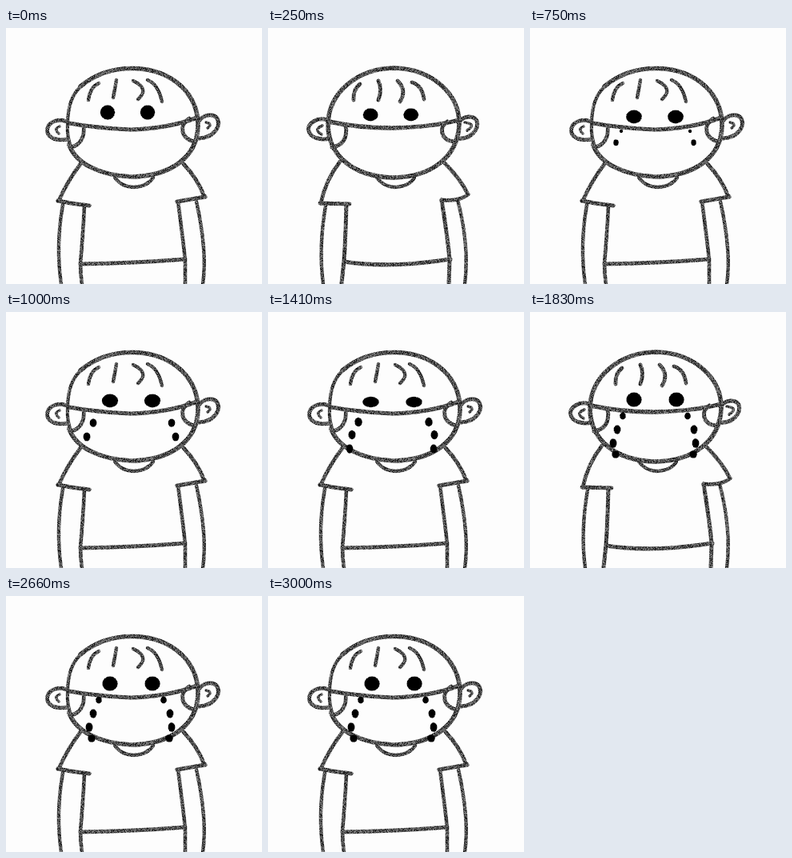
Animation, 320 px wide and 320 px high, one loop 10 s. Source, as an HTML page with a canvas:

```html
<!DOCTYPE html>
<html lang="en">
<head>
<meta charset="utf-8">
<title>Crying behind the mask</title>
<style>
  html, body { margin: 0; width: 100%; height: 100%; overflow: hidden; background: #fdfdfd; }
  canvas { display: block; width: 320px; height: 320px; }
</style>
</head>
<body>
<canvas id="stage" width="320" height="320"></canvas>
<script>
const SIZE = 320, LOOP = 10000, FPS = 12, LAST = 36;
const stage = document.getElementById('stage').getContext('2d');

// Two drawings of the boy; each entry is [line width, path].
const poses = [
  [
    [5.6, 'M93 73C112 57 136 50 160 50.500C210 52 241 84 240 124C238 162 206 185 157 186C116 184 87 169 79 146'],
    [4.2, 'M96 71C80 83 77 104 77 121Q76 138 82 150'],
    [5.2, 'M79 119Q112 125 155 127Q202 126 239 112'],
    [4.8, 'M97 122C99 137 92 147 81 149M229 113C217 121 217 137 235 142'],
    [5, 'M76 117C63 112 51 119 51.500 129C53 139 65 141 77 139'],
    [5, 'M240 118C246 108 258 106 264 113C269 123 260 137 241 138'],
    [3.4, 'M67 123Q59 126 66 132M250 118Q259 120 252 125'],
    [4.4, 'M116 69Q105 74 103 90M138 65Q136 77 134 87M159 66Q180 76 165 89M177 65Q190 70 195 92'],
    [4.4, 'M136 187Q145 199 160 199Q177 198 184 187'],
    [4.8, 'M93 170Q77 191 66 216M222 170Q240 189 248 211'],
    [5.2, 'M65 216Q84 220 104 222M249 211L214 217'],
    [4.6, 'M98 222Q96 262 93 294Q93 307 95 320M215 217Q221 262 224 290L224 320'],
    [4.4, 'M71 221Q62 273 69 320M238 217Q252 280 246 320'],
    [4.8, 'M93 295Q160 294 224 289']
  ],
  [
    [5.6, 'M157 50C207 51 240 84 239 121C237 161 205 186 157 187C106 186 75 159 75 120C76 80 112 51 157 50Z'],
    [5.4, 'M76 117Q113 125 155 125Q204 124 239 115'],
    [5, 'M97 121C100 138 93 147 80 149M224 117C213 124 216 140 232 142'],
    [5, 'M74 115C62 111 50 119 50.500 127C52 137 65 141 77 138'],
    [5, 'M238 118C245 109 257 109 261 116C264 126 254 140 236 138'],
    [3.6, 'M68 122Q56 127 67 133M246 118Q261 120 249 128'],
    [4.8, 'M115 70Q106 77 107 90M138 66Q143 77 138 90M162 66Q174 78 165 92M180 68Q193 72 195 89'],
    [4.4, 'M136 187Q144 198 158 199Q177 198 183 187'],
    [4.8, 'M90 167Q72 190 66 219M220 168Q241 189 250 208'],
    [4.8, 'M65 219L102 220M250 208Q240 217 217 215'],
    [5, 'M98 220Q97 262 95 291L92 319M217 215Q225 265 227 290L226 320'],
    [4.4, 'M72 222Q63 275 69 320M237 215Q252 272 246 320'],
    [5.2, 'M95 292Q150 301 228 289']
  ]
];

// Keys: step, left x, right x, y, x radius, y radius.
const eyeKeys = [
  [0, 127, 177, 105.5, 9.3, 9.2],
  [2, 127.5, 178, 106.5, 9.4, 9],
  [6, 130, 181, 114, 9.8, 5.5],
  [9, 130, 182, 111, 10, 8.5],
  [12, 130, 183, 111, 10.2, 8.5],
  [17, 128.5, 182.5, 112.5, 10.4, 6.8],
  [20, 130, 183, 109.5, 9.7, 9.3]
];
const tearKeys = [
  [[6, 114, 197, 130.5, 2.2, 2.2], [12, 101, 212, 156, 4.5, 5.6], [17, 102, 207, 171, 4.4, 5.8], [20, 107, 204, 178, 4.8, 4.8]],
  [[9, 114, 200, 129, 2.2, 2.2], [12, 109, 207, 138.5, 4.4, 5.3], [17, 105, 208, 153.5, 4.6, 5.8], [20, 104, 207, 164, 4.5, 6]],
  [[15, 115, 198, 130, 2.2, 2.2], [17, 113, 201, 137.5, 4.8, 5.8], [20, 109, 205, 147, 4.5, 5.8]],
  [[18, 117, 196, 128, 2.2, 2.2], [20, 116, 197, 130, 4, 4.4]]
];

function layer() {
  const c = document.createElement('canvas');
  c.width = c.height = SIZE;
  const g = c.getContext('2d', { willReadFrequently: true });
  g.lineCap = g.lineJoin = 'round';
  g.filter = 'blur(0.7px)';
  return g;
}

function random(seed) {
  return () => {
    seed = seed + 0x6D2B79F5 | 0;
    let v = Math.imul(seed ^ seed >>> 15, 1 | seed);
    v = v + Math.imul(v ^ v >>> 7, 61 | v) ^ v;
    return ((v ^ v >>> 14) >>> 0) / 4294967296;
  };
}

// Crayon texture: thins the ink at random, leaving the core alone when solid.
function grain(g, seed, solid) {
  const image = g.getImageData(0, 0, SIZE, SIZE), d = image.data, rnd = random(seed);
  for (let i = 3; i < d.length; i += 4) {
    const r = rnd();
    if (d[i] && !(solid && d[i] > 235)) d[i] *= 0.45 + 0.55 * r;
  }
  g.putImageData(image, 0, 0);
}

const bases = poses.map((lines, i) => {
  const g = layer();
  g.strokeStyle = '#0c0c0c';
  for (const [width, path] of lines) {
    g.lineWidth = width;
    g.stroke(new Path2D(path));
  }
  grain(g, 11 + i * 50, false);
  return g.canvas;
});

function sample(keys, n) {
  if (n < keys[0][0]) return null;
  const j = keys.findIndex(k => k[0] > n);
  if (j < 0) return keys[keys.length - 1];
  const a = keys[j - 1], b = keys[j], f = (n - a[0]) / (b[0] - a[0]);
  return a.map((v, i) => v + (b[i] - v) * f);
}

const blobs = layer();

function drawPair(key) {
  if (!key) return;
  const [, left, right, y, rx, ry] = key;
  for (const x of [left, right]) {
    blobs.beginPath();
    blobs.ellipse(x, y, rx, ry, 0, 0, 7);
    blobs.fill();
  }
}

function draw(n) {
  blobs.clearRect(0, 0, SIZE, SIZE);
  [eyeKeys, ...tearKeys].forEach(keys => drawPair(sample(keys, n)));
  grain(blobs, 7, true);
  stage.fillStyle = '#fdfdfd';
  stage.fillRect(0, 0, SIZE, SIZE);
  stage.drawImage(bases[n >> 1 & 1], 0, 0);
  stage.drawImage(blobs.canvas, 0, 0);
}

let shown = -1;
const start = performance.now();

function tick() {
  const t = (performance.now() - start) % LOOP;
  let n = Math.min(LAST, Math.floor((t + 7) * FPS / 1000));
  if (n > 18) n -= n % 2; // drawn on twos once the crying settles
  if (n !== shown) draw(shown = n);
  requestAnimationFrame(tick);
}
tick();
</script>
</body>
</html>
```
